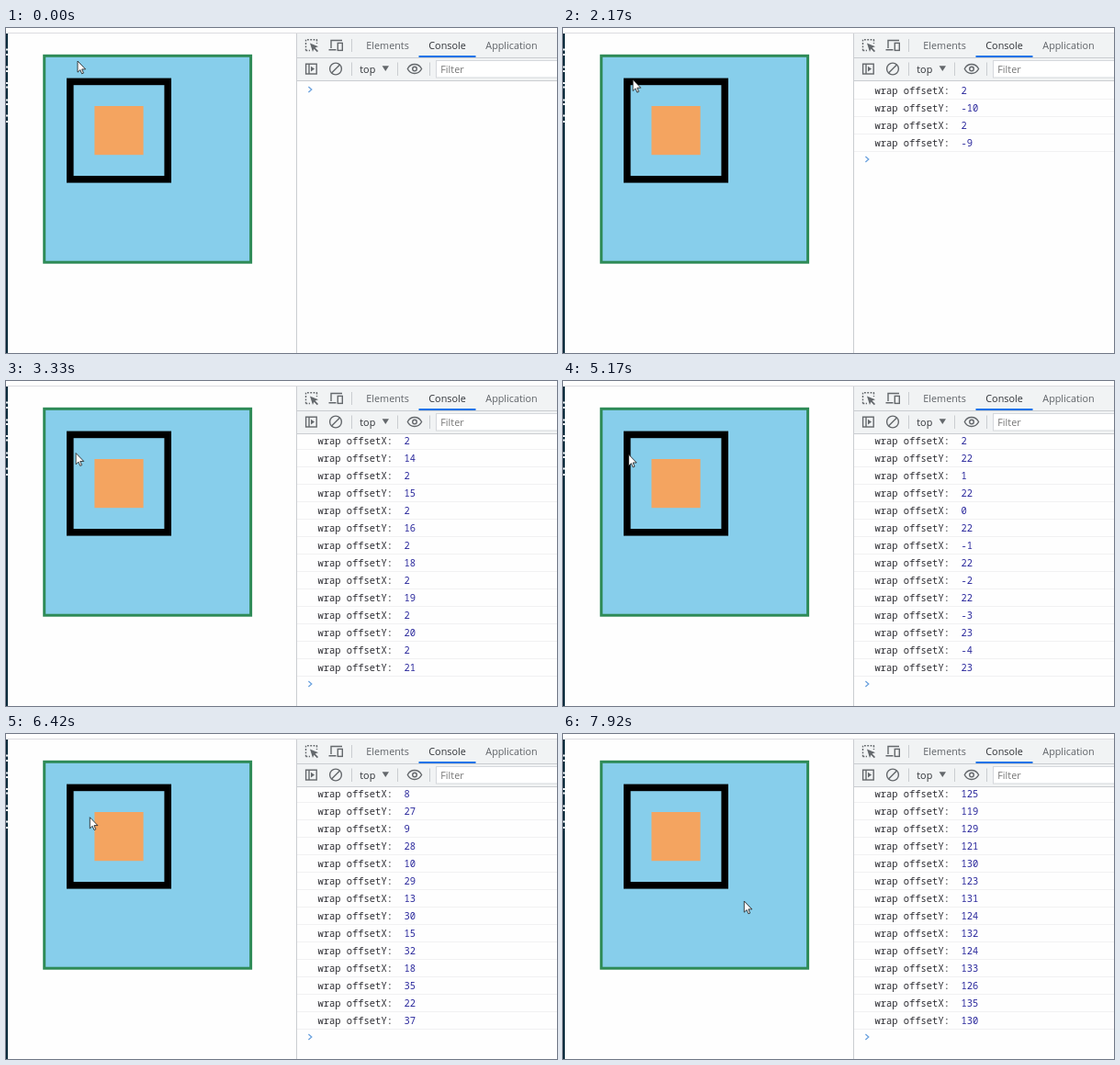
Recreate the animation shown at these times as an HTML page. Size 600x354 px, loop 8000 ms.

```html
<!DOCTYPE html>
<html lang="en">
<head>
<meta charset="utf-8">
<title>Mouse offset in the console</title>
<style>
  html, body { margin: 0; width: 100%; height: 100%; overflow: hidden; background: #fefefe; }
  svg { display: block; width: 100vw; height: 100vh; }
  .ui { font: 10.8px "Open Sans", "Noto Sans", sans-serif; fill: #5f6368; }
  .log { font: 10.45px "Noto Sans Mono", "DejaVu Sans Mono", monospace; fill: #2c2c32; }
  .num { fill: #2a289c; }
  .icon { fill: none; stroke: #64686c; stroke-width: 1.4; }
  .solid { fill: #64686c; stroke: none; }
  .rule { fill: none; stroke: #cacdd1; }
</style>
</head>
<body>
<svg viewBox="0 0 600 354" xmlns="http://www.w3.org/2000/svg">
  <rect width="600" height="354" fill="#fefefe"/>

  <!-- page -->
  <rect y="6" width="2" height="348" fill="#0b2b3c"/>
  <path d="M0 23.5h2M0 29h2.5M0 42.5h2M0 47h2.5M0 60h2.5M0 64.5h2M0 78.5h2.5M0 83h2M0 95.5h2M0 102h3" stroke="#eef2f4" stroke-width="2"/>
  <rect x="41.7" y="30.3" width="224.9" height="224.9" fill="#87ceeb" stroke="#2e8b57" stroke-width="3"/>
  <rect x="69.8" y="58.4" width="106.4" height="106.4" fill="none" stroke="#000" stroke-width="7.6"/>
  <rect x="96.4" y="85" width="53.2" height="53.2" fill="#f4a460"/>

  <!-- console output -->
  <g id="rows"></g>
  <path id="prompt" d="M329.4 -3L332.8 0L329.4 3" fill="none" stroke="#6ba2de" stroke-width="1.3"/>

  <!-- toolbars -->
  <rect x="317" y="6" width="283" height="51.5" fill="#f1f3f4"/>
  <path d="M2 5.5H600" stroke="#dcdce0"/>
  <path class="rule" d="M316.5 6V354M317 32.5H600M317 57.5H600M376.5 12V26M376.5 37.5V52M426.5 37.5V52M461.5 37.5V52"/>
  <rect x="449.5" y="30" width="62" height="2" fill="#1a73e8"/>
  <rect x="468.5" y="35.5" width="140" height="18.5" fill="#fff" stroke="#d5d8dc"/>
  <g class="ui">
    <text x="392.3" y="22.8">Elements</text>
    <text x="460.3" y="22.8" fill="#303338">Console</text>
    <text x="522.3" y="22.8">Application</text>
    <text x="385.3" y="48.5" fill="#303338">top</text>
    <text x="473.3" y="48.8" fill="#757575">Filter</text>
  </g>
  <g class="icon">
    <path d="M326.5 24.5V12.8H339" stroke-dasharray="1.8 1.5"/>
    <path d="M338.5 12.8V17M326.5 24.5H331" stroke-dasharray="1.8 1.5"/>
    <path class="solid" d="M331 16.5L340 20.2L336.6 21.6L340 25L338.8 26.2L335.4 22.8L334 26Z"/>
    <path d="M354 22V13.5H366M351.5 23.8H359.5"/>
    <rect x="361.3" y="16.4" width="5" height="8"/>
    <rect x="326.6" y="39.2" width="11.6" height="10.8"/>
    <path d="M330 39V50"/>
    <path class="solid" d="M332 41.8L336 44.6L332 47.4Z"/>
    <circle cx="359" cy="44.5" r="6.4"/>
    <path d="M363.5 40L354.5 49"/>
    <path class="solid" d="M409.6 41.3H417L413.3 47Z"/>
    <path d="M437.3 44.5C440.5 37.8 449.2 37.8 452.6 44.5C449.2 51.2 440.5 51.2 437.3 44.5Z"/>
    <circle cx="445" cy="44.5" r="2.3"/>
  </g>

  <path id="cursor" d="M0 0V16L3.7 12.6L6.1 18.2L8.5 17.2L6.1 11.7H11.3Z" fill="#fff" stroke="#1c1c1c" stroke-width="1.1" stroke-linejoin="round"/>
</svg>
<script>
const LOOP = 8000, STEP = 1000 / 12, SCALE = 0.76;
const VISIBLE = 14, PITCH = 19;
const $ = id => document.getElementById(id);

// Positions are mouse offsets inside the black box; k counts steps of 1/12 s.
const path = [], logs = [];
const move = (k, x, y) => path.push({ k, x, y });
const log = (k, ...points) => {
  for (const [x, y] of points) logs.push({ k, name: 'X', v: x }, { k, name: 'Y', v: y });
  move(k, ...points[points.length - 1]);
};
const glide = (k0, k1, a, b, ease, put) => {
  for (let k = k0; k <= k1; k++) {
    const p = ease((k - k0 + 1) / (k1 - k0 + 1));
    put(k, a[0] + (b[0] - a[0]) * p, a[1] + (b[1] - a[1]) * p);
  }
};
const logRounded = (k, x, y) => log(k, [Math.round(x), Math.round(y)]);
const linear = t => t;
const smooth = t => t * t * (3 - 2 * t);
const easeIn = t => t ** 1.6;

move(0, 4.5, -35);
glide(3, 11, [4.5, -35], [2.3, -11.5], smooth, move);
log(12, [2, -10]);
move(16, 2, -9.2);
log(26, [2, -9]);
move(26, 2, -8.3);
glide(27, 31, [2, -9], [2, 12], linear, logRounded);
[14, 15, 16, 18, 19, 20, 21].forEach((y, i) => log(34 + i, [2, y]));
log(47, [2, 22], [1, 22]);
for (let i = 0; i < 3; i++) log(48 + i, [-i, 22]);
log(51, [-3, 23]);
log(62, [-4, 23]);
log(63, [-3, 23]);
log(64, [-2, 24], [-1, 24]);
for (let x = 0; x < 5; x++) log(65 + x, [x, 25]);
log(70, [5, 26]);
move(70, 6.6, 26.6);
log(71, [8, 27]);
glide(72, 81, [8, 27], [39, 50], easeIn, logRounded);
log(82, [46, 57], [56, 67], [65, 75], [69, 77], [72, 78]);
log(83, [74, 79], [74, 80], [75, 81], [76, 81]);
glide(84, 90, [76, 81], [99, 101], easeIn, logRounded);
log(93, [125, 119], [129, 121], [130, 123], [131, 124], [132, 124], [133, 126], [135, 130]);
move(93, 159.5, 155.5);
move(95, 161.4, 157.1);

const make = (tag, attrs, parent) => {
  const el = document.createElementNS('http://www.w3.org/2000/svg', tag);
  for (const key in attrs) el.setAttribute(key, attrs[key]);
  return parent.appendChild(el);
};
const rows = Array.from({ length: VISIBLE }, (_, i) => {
  const g = make('g', { class: 'log' }, $('rows'));
  const y = 72 + i * PITCH;
  make('path', { d: `M317 ${y + 5.5}H600`, stroke: '#f1f1f2' }, g);
  return {
    g,
    label: make('text', { x: 339.5, y }, g),
    value: make('text', { x: 433.6, y, class: 'num' }, g)
  };
});

function draw(ms) {
  const k = Math.floor((ms % LOOP + 5) / STEP);
  const past = e => e.k <= k;
  const { x, y } = path.filter(past).pop();
  $('cursor').setAttribute('transform',
    `translate(${74.6 + x * SCALE} ${62.6 + y * SCALE}) scale(${SCALE})`);

  const lines = logs.filter(past).slice(-VISIBLE);
  const scroll = lines.length === VISIBLE ? -3 : 0;
  rows.forEach((row, i) => {
    const line = lines[i];
    row.g.style.display = line ? '' : 'none';
    if (!line) return;
    row.label.textContent = `wrap offset${line.name}:`;
    row.value.textContent = line.v;
  });
  $('rows').setAttribute('transform', `translate(0 ${scroll})`);
  $('prompt').setAttribute('transform', `translate(0 ${67 + lines.length * PITCH + scroll})`);
}

const start = performance.now();
function tick() {
  draw(performance.now() - start);
  requestAnimationFrame(tick);
}
tick();
</script>
</body>
</html>
```
